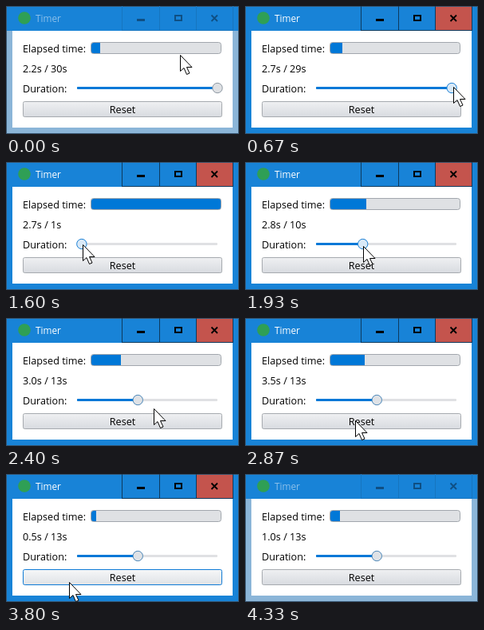
An HTML page for the animation above (4.39 s loop, 292 by 160 pixels).

```html
<!DOCTYPE html>
<html lang="en">
<head>
<meta charset="utf-8">
<title>Timer</title>
<style>
  html, body { margin: 0; width: 100%; height: 100%; overflow: hidden; background: #fff; }
  svg { display: block; width: 100%; height: 100%; }
  text { font: 12.65px "Open Sans", "Noto Sans", sans-serif; fill: #000; white-space: pre; }
  .crisp { shape-rendering: crispEdges; }
  #frame { fill: #8bb5d8; }
  #bar { fill: #1883d7; }
  #title { font-size: 11.8px; fill: #8cc0ea; }
  .line { stroke: #1775bf; }
  .glyph { stroke: #0f4f83; fill: none; }
  #close { fill: none; }
  .active #frame { fill: #1883d7; }
  .active #title { fill: #fff; }
  .active .line { stroke: #0e3a5e; }
  .active .glyph { stroke: #000; }
  .active #close { fill: #c4544d; }
  #knob { fill: #dee0e3; stroke: #8d98a3; }
  .focus #knob { fill: #dfe2e6; stroke: #4a86b8; }
  .drag #knob { fill: #d9e9f7; stroke: #1a80d6; }
  #button { fill: url(#face); stroke: #a6aaaf; }
  .hover #button { fill: url(#lit); stroke: #0f7bd6; }
  .down #button { fill: #cfd3d8; }
</style>
</head>
<body>
<svg id="app" viewBox="0 0 292 160" preserveAspectRatio="none">
  <defs>
    <linearGradient id="face" x2="0" y2="1">
      <stop offset="0" stop-color="#eff0f2"/>
      <stop offset="1" stop-color="#d8dbe0"/>
    </linearGradient>
    <linearGradient id="lit" x2="0" y2="1">
      <stop offset="0" stop-color="#f6f7f8"/>
      <stop offset="1" stop-color="#dfe2e6"/>
    </linearGradient>
    <clipPath id="trough"><rect x="107" y="46" width="163" height="14" rx="2.5"/></clipPath>
  </defs>

  <g class="crisp">
    <rect id="frame" width="292" height="160"/>
    <rect id="bar" width="292" height="31"/>
    <rect x="8" y="31" width="276" height="121" fill="#fff"/>
    <rect x=".5" y=".5" width="291" height="159" fill="none" stroke="#35506a"/>
    <rect id="close" x="239" y="1" width="45" height="29"/>
    <path class="line" fill="none" d="M145.5 0V30.5H284.5V0M192.5 0V30M238.5 0V30"/>
    <path class="glyph" stroke-width="3" d="M164 17.5h10"/>
    <path class="glyph" stroke-width="2" d="M212 12h8v6h-8z"/>
  </g>
  <path class="glyph" stroke-width="1.8" d="M257.5 11.5l7.5 7.5m0-7.5l-7.5 7.5"/>
  <circle cx="23" cy="15" r="7.8" fill="#2f9f55"/>
  <text id="title" x="37" y="20">Timer</text>

  <text x="21" y="58">Elapsed time:</text>
  <rect x="106.5" y="45.5" width="163" height="14" rx="3" fill="#dfe1e4"/>
  <rect id="fill" x="107" y="46" height="13" fill="#0078d7" clip-path="url(#trough)"/>
  <rect x="106.5" y="45.5" width="163" height="14" rx="3" fill="none" stroke="#a2a7ad"/>

  <text id="label" x="21" y="83"></text>

  <text x="21" y="108">Duration:</text>
  <rect x="89" y="101" width="176" height="3" rx="1" fill="#e0e1e3"/>
  <rect id="track" x="89" y="101" height="3" rx="1" fill="#0078d7"/>
  <circle id="knob" cy="102.5" r="6.2"/>

  <rect id="button" x="21.5" y="119.5" width="249" height="19" rx="2"/>
  <text x="146" y="134" text-anchor="middle">Reset</text>

  <path id="cursor" d="M0 0V20L4.5 16L8 24L11.5 22.5L8 15H14.5Z" fill="#fff" stroke="#000" stroke-linejoin="round"/>
</svg>
<script>
  const LOOP = 4390, STEP = LOOP / 66;
  const PRESS = 600, RELEASE = 2100, RESET = 3190;
  const LEFT = 89, SPAN = 176, MAX = 30;
  const $ = id => document.getElementById(id);
  const clamp = (v, lo, hi) => Math.min(hi, Math.max(lo, v));
  const ease = u => (1 - Math.cos(Math.PI * u)) / 2;

  // Where the pointer rests or turns: [time, x, y]
  const stops = [
    [0, 219, 62], [530, 265, 102], [PRESS, 265, 102], [1356, 97, 104],
    [1600, 97, 104], [RELEASE, 168, 107], [2340, 188, 113], [2800, 139, 129],
    [3400, 139, 129], [3791, 80, 136], [4000, 58, 165]
  ];

  function pointer(t) {
    const i = Math.max(1, stops.findIndex(s => s[0] > t));
    if (t >= stops[stops.length - 1][0]) return stops[stops.length - 1].slice(1);
    const [t0, x0, y0] = stops[i - 1], [t1, x1, y1] = stops[i];
    const u = ease((t - t0) / (t1 - t0));
    return [x0 + (x1 - x0) * u, y0 + (y1 - y0) * u];
  }

  // The slider follows the pointer between press and release, a little late
  function duration(t) {
    const [x] = pointer(clamp(t - 12, PRESS, RELEASE));
    return clamp(Math.round((x - 1.5 - LEFT) / SPAN * MAX), 0, MAX);
  }

  const ticks = (t, start) => Math.max(0, Math.floor((t - start) / 110));

  // Elapsed tenths; the clock stalls while the slider is dragged
  function tenths(t) {
    if (t >= RESET) return ticks(t, RESET + 20);
    if (t >= RELEASE) return 28 + ticks(t, RELEASE - 30);
    return t < 1890 ? Math.min(27, 22 + ticks(t, -20)) : 28;
  }

  function draw(t) {
    const within = (a, b) => t >= a && t < b;
    const total = duration(t);
    const elapsed = tenths(t) / 10;
    const slide = total / MAX * SPAN;
    const [x, y] = pointer(t);

    $("label").textContent = `${elapsed.toFixed(1)}s / ${total}s`;
    $("fill").setAttribute("width", Math.floor(Math.min(1, elapsed / total) * 162));
    $("track").setAttribute("width", slide);
    $("knob").setAttribute("cx", LEFT + slide);
    $("cursor").setAttribute("transform",
      `translate(${Math.round(x) - .5} ${Math.round(y) - .5})`);

    const state = {
      active: within(PRESS + 40, 4100),
      focus: t >= PRESS + 40,
      drag: within(PRESS + 40, RELEASE),
      hover: t > RESET - 200 && y < 139,
      down: within(RESET - 140, RESET)
    };
    for (const name in state) $("app").classList.toggle(name, state[name]);
  }

  const begin = performance.now();
  function tick() {
    const t = (performance.now() - begin) % LOOP;
    draw(Math.floor(t / STEP) * STEP);
    requestAnimationFrame(tick);
  }
  tick();
</script>
</body>
</html>
```
